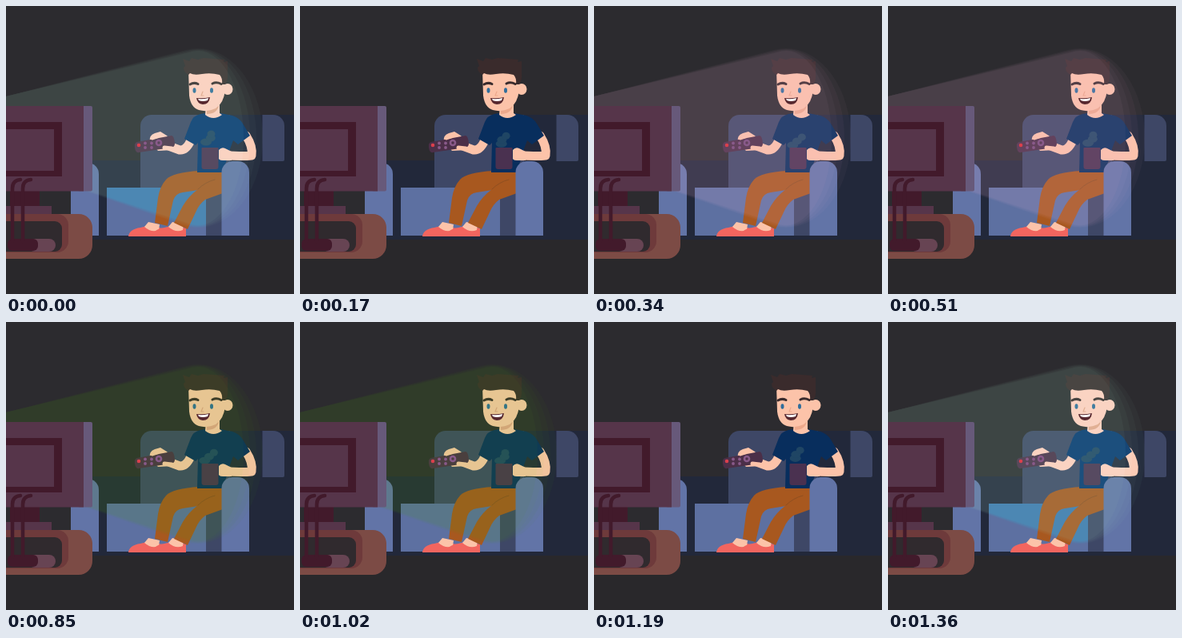
Recreate the animation shown at these times as an HTML page with a canvas. Size 360 by 360 pixels, loop 1.53 s.

```html
<!DOCTYPE html>
<html lang="en">
<head>
<meta charset="utf-8">
<title>Evening television</title>
<style>
html, body { margin: 0; width: 100%; height: 100%; overflow: hidden; background: #2c2b2f; }
canvas { display: block; width: 360px; height: 360px; }
</style>
</head>
<body>
<canvas id="stage"></canvas>
<script>
const SIZE = 360, STEP = 170;
const scale = Math.max(1, window.devicePixelRatio || 1);

const dark = {
  wall: '#2c2b2f', floor: '#29282b', hull: '#22283a', back: '#3e4766',
  seat: '#5d70a1', arm: '#6274a7', skin: '#fcc3a9', shade: '#eda98c', hair: '#3a2b2c',
  shirt: '#082e5d', pants: '#a8581f', crease: '#8f4f20', mug: '#4a3150', remote: '#4b2f48',
  steam: '#1f4564', eye: '#2f6d9b'
};

function mix(from, to, amount) {
  const channel = (hex, i) => parseInt(hex.slice(1 + 2 * i, 3 + 2 * i), 16);
  const blend = i => Math.round(channel(from, i) * (1 - amount) + channel(to, i) * amount);
  return `rgb(${blend(0)}, ${blend(1)}, ${blend(2)})`;
}
const tint = (color, amount) => Object.fromEntries(
  Object.entries(dark).map(([part, base]) => [part, mix(base, color, amount)]));

const cyan = { ...tint('#a0d7be', 0.15), seat: '#4c87b3', skin: '#fad3c2', shirt: '#1c4f7d' };
const purple = tint('#edb0d6', 0.15);
const green = { ...tint('#46960a', 0.16), skin: '#e7c592' };
const lights = [cyan, null, purple, purple, null, green, green, null, cyan];

function makeLayer(canvas) {
  canvas.width = canvas.height = SIZE * scale;
  const g = canvas.getContext('2d');
  g.scale(scale, scale);
  return g;
}
const main = makeLayer(document.getElementById('stage'));
const lit = makeLayer(document.createElement('canvas'));
const mask = makeLayer(document.createElement('canvas'));

function rect(g, color, x, y, w, h, r = 0) {
  g.fillStyle = color;
  g.beginPath();
  g.roundRect(x, y, w, h, r);
  g.fill();
}
function shape(g, color, d) {
  g.fillStyle = color;
  g.fill(new Path2D(d));
}
function line(g, color, width, d) {
  g.strokeStyle = color;
  g.lineWidth = width;
  g.lineCap = g.lineJoin = 'round';
  g.stroke(new Path2D(d));
}
function oval(g, color, x, y, rx, ry = rx) {
  g.fillStyle = color;
  g.beginPath();
  g.ellipse(x, y, rx, ry, 0, 0, Math.PI * 2);
  g.fill();
}

// The beam ends in nested ellipses that fade toward the right.
function buildMask(g) {
  const lean = Math.PI / 2 + 0.19;
  for (let ring = 0; ring < 4; ring++) {
    g.globalAlpha = ring < 3 ? 0.25 + 0.1 * ring : 1;
    g.beginPath();
    g.moveTo(0, 113);
    g.ellipse(240, 165, 81 - 8 * ring, 112 - ring, 0, -lean, lean);
    g.lineTo(0, 197);
    g.fill();
  }
}

function drawSofa(g, c) {
  rect(g, c.hull, 108, 193, 252, 99);
  rect(g, c.hull, 270, 136, 90, 60);
  rect(g, c.back, 168, 136, 112, 151, [14, 0, 0, 0]);
  rect(g, c.back, 320.5, 136, 27.5, 58, [0, 14, 2, 0]);
  rect(g, c.arm, 81, 196, 35, 91, [0, 14, 0, 0]);
  rect(g, c.seat, 126, 227, 124, 60);
}

function drawFoot(g, c, x) {
  shape(g, '#f2655f', `M${x} 288q1-9 15-11l12-3 15 4v10z`);
  shape(g, c.skin, `M${x + 20} 276l5-6 14 3-1 7q-9 4-18-4z`);
}

function drawLegs(g, c) {
  drawFoot(g, c, 153);
  drawFoot(g, c, 183);
  shape(g, c.pants, 'M271 206H242Q208 208 200 217Q192 226 190 240L186 271L202 275L209 243Q212 234 221 233L240 230L271 226Z');
  shape(g, c.pants, 'M271 207L240 229Q228 238 221 250L210 271L227 279L237 258Q241 248 249 242L271 234Z');
  line(g, c.crease, 1, 'M240 229Q249 220 261 217');
}

function drawHead(g, c) {
  oval(g, c.skin, 277, 104, 6.5, 7);
  shape(g, c.skin, 'M228 80H274V105Q272 122 262 128Q252 133 241 130Q231 127 229 112Z');
  shape(g, c.hair, 'M221 66L229 69L232 65L240 67L247 65L273 67L272 70L277 69V84Q278 93 274 98H270Q271 90 267 86Q256 83 245 85Q235 87 230 84L228 86Q222 83 222 77L224 75Z');
  line(g, c.hair, 3, 'M230 98Q235 95 240 97.5M258 97Q263 94.5 269 97.5');
  for (const x of [235.5, 257]) oval(g, c.eye, x, 105.5, 2, 3.3);
  line(g, c.shade, 1.2, 'M246 107L244 112H247');
  shape(g, '#57282f', 'M238 115Q246 116 255 114Q254 123 246 123Q239 122 238 115Z');
  shape(g, '#ffffff', 'M240 116Q246 117 253 115L252 118Q246 120 241 118Z');
}

function drawSteam(g, c, step) {
  for (let puff = 0; puff < 3; puff++) {
    const x = 250 + 4 * puff + 2 * Math.sin(2.1 * step + 2 * puff);
    const y = 172 - 5 * puff - 2 * Math.cos(1.7 * step);
    oval(g, c.steam, x, y, 7 - puff, 4.5);
  }
}

function drawBody(g, c, step) {
  line(g, c.skin, 11, 'M231 168Q225 181 217 180L198 173');
  line(g, c.skin, 11, 'M300 162Q309 176 307 187Q304 188 279 187');
  shape(g, c.shirt, 'M249 134H268L283 137Q292 140 296 147L305 162L290 173L284 168Q276 188 272 208H239L240 171L237 174L223 166L231 145Q234 137 243 135Z');
  shape(g, c.skin, 'M250 124H267V134L270 136Q259 144 249 136Z');
  shape(g, c.shade, 'M251 129Q259 129 266 124Q264 135 251 135Z');
  drawSteam(g, c, step);
}

function drawRemote(g, c) {
  shape(g, c.skin, 'M180 170Q178 162 186 159L193 157L201 162L210 172V180L190 181Z');
  shape(g, c.remote, 'M164 170L207 162Q210 162 211 172Q211 176 207 177L166 183Q162 184 161 177Q160 171 164 170Z');
  oval(g, '#db404d', 166, 174, 2.3);
  for (let i = 0; i < 4; i++) oval(g, '#895a8a', 174 + 8 * (i >> 1), 171.5 + 5.5 * (i % 2), 1.9);
  oval(g, '#895a8a', 191, 171, 4.3);
  oval(g, c.remote, 191, 171, 1.7);
  line(g, c.skin, 5, 'M183 165L189 163M207 178L198 177');
}

function drawMug(g, c) {
  rect(g, c.mug, 244.5, 177, 21, 27, [1, 1, 3, 3]);
  shape(g, c.skin, 'M266 180Q270 175 276 179L282 182V193H271Q265 193 266 189Z');
}

function drawRoom(g, c, step) {
  rect(g, c.wall, 0, 0, SIZE, SIZE);
  rect(g, c.floor, 0, 292, SIZE, 68);
  drawSofa(g, c);
  drawLegs(g, c);
  drawBody(g, c, step);
  drawHead(g, c);
  drawRemote(g, c);
  rect(g, c.arm, 269.5, 194, 34.5, 93, [14, 14, 0, 0]);
  drawMug(g, c);
}

function drawTv(g) {
  const plum = '#56354a', wine = '#421a2b';
  rect(g, '#7c4b45', -20, 260, 128, 56, 17);
  rect(g, '#6e3a3b', -20, 260, 98, 48, 14);
  rect(g, '#302a2e', -20, 269, 90, 38, 9);
  rect(g, plum, 0, 250, 57, 10);
  rect(g, wine, 5, 231, 37, 19);
  rect(g, '#67597a', 90, 125, 18, 106.5, 2);
  rect(g, plum, 0, 125, 97, 106.5);
  rect(g, wine, 0, 145, 70, 68);
  rect(g, plum, 0, 154, 60, 52);
  rect(g, '#674453', 28, 291, 34, 16, 8);
  rect(g, wine, 2, 291, 38, 15, 6);
  for (const x of [8, 21]) line(g, wine, 4.5, `M${x + 10} 217q-10 1-10 11v66`);
}

function drawStep(step) {
  drawRoom(main, dark, step);
  if (lights[step]) {
    drawRoom(lit, lights[step], step);
    lit.globalCompositeOperation = 'destination-in';
    lit.drawImage(mask.canvas, 0, 0, SIZE, SIZE);
    lit.globalCompositeOperation = 'source-over';
    main.drawImage(lit.canvas, 0, 0, SIZE, SIZE);
  }
  drawTv(main);
}

buildMask(mask);
const start = performance.now();
let shown = -1;
function tick() {
  const step = Math.floor((performance.now() - start) / STEP) % lights.length;
  if (step !== shown) drawStep(shown = step);
  requestAnimationFrame(tick);
}
tick();
</script>
</body>
</html>
```
